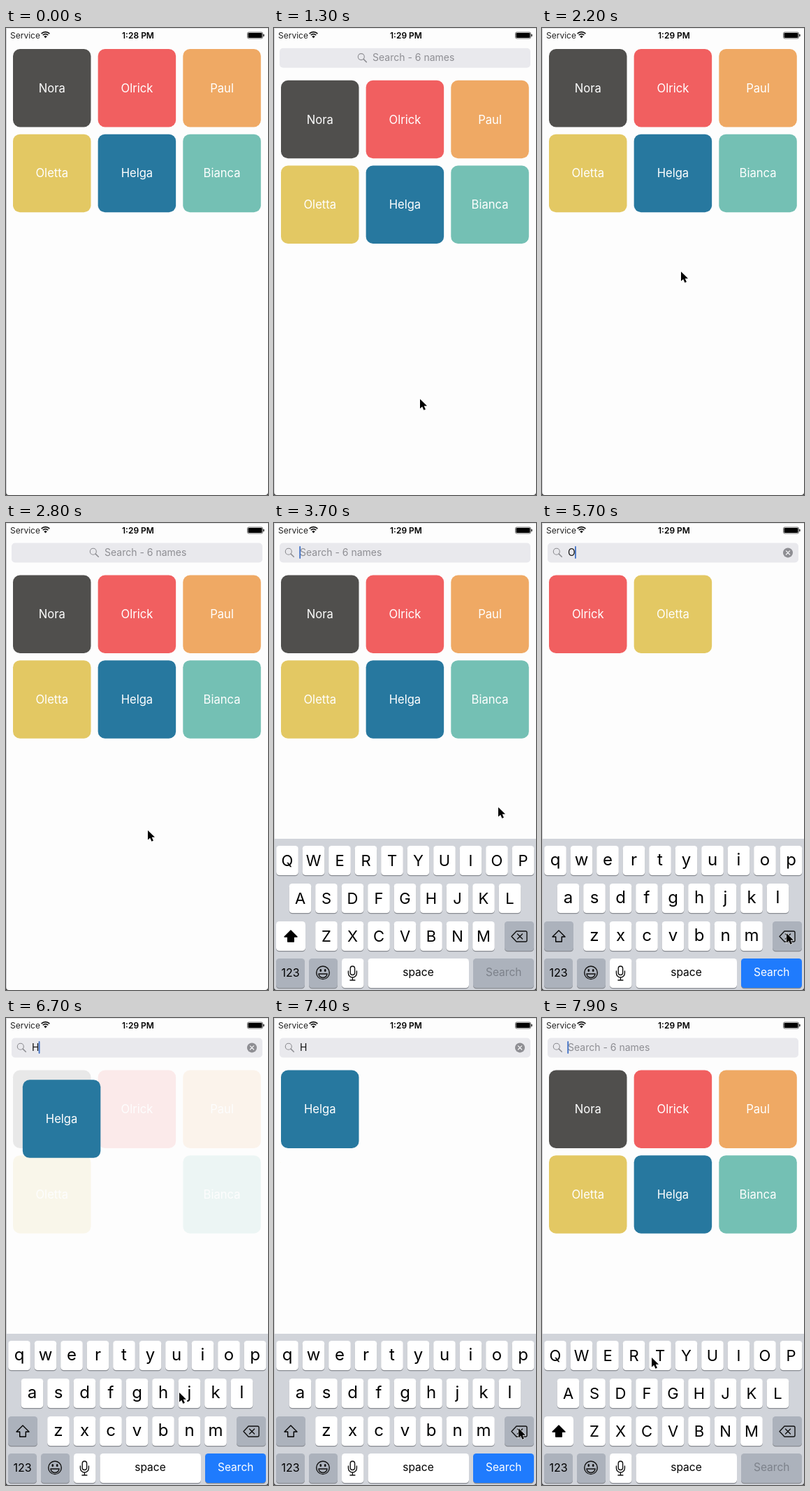
Write an HTML page that moves like this. It is 375x667 px and loops after 8000 ms.

```html
<!DOCTYPE html>
<html lang="en">
<head>
<meta charset="utf-8">
<title>Name search</title>
<style>
  html, body { margin: 0; width: 100%; height: 100%; overflow: hidden; background: #fdfdfd; }
  svg { display: block; width: 100vw; height: 100vh; }
  text { font-family: Inter, Roboto, "Liberation Sans", sans-serif; }
</style>
</head>
<body>
<svg id="stage" viewBox="0 0 375 667"></svg>
<script>
const LOOP = 8000, STEP = 100, BAR_SHIFT = 44.5;
const TILE = 111.5, PITCH = 121.65;
const PEOPLE = [
  ["Nora", "#504f4d"], ["Olrick", "#f15f60"], ["Paul", "#efa964"],
  ["Oletta", "#e3c863"], ["Helga", "#27789f"], ["Bianca", "#74c0b4"]
];

// Typed text over time
const QUERIES = [[0, ""], [4050, "O"], [4570, "Ol"], [5430, "O"], [5780, ""], [6463, "H"], [7450, ""]];
const FOCUS = 3220, FILTER_MS = 300;

// Key poses: time, then values
const SCROLL = [[0, 0], [300, 0], [800, 62], [900, 62], [1200, 44.8], [1450, 44.8],
  [1900, 0], [2380, 0], [2700, BAR_SHIFT]];
const POINTER = [[100, 206, 350], [300, 206, 350], [850, 209, 526], [1000, 209, 531],
  [1300, 209, 530], [1450, 209, 530], [2000, 199, 350], [2200, 199, 348], [2350, 199, 348],
  [2700, 203, 439], [2850, 203, 439], [3150, 195, 40], [3300, 195, 40], [3700, 321, 406],
  [4000, 322, 484], [4250, 322, 484], [4550, 342, 542], [5000, 342, 542], [5350, 350, 586],
  [5900, 350, 586], [6350, 228, 535], [6550, 230, 535], [6700, 248, 535], [7150, 350, 586],
  [7600, 350, 586], [7800, 257, 526], [7900, 157, 485]];

const clamp = v => Math.max(0, Math.min(1, v));
const ease = v => { v = clamp(v); return v * v * (3 - 2 * v); };
const mix = (a, b, k) => a + (b - a) * k;

function pose(keys, t) {
  let i = 0;
  while (i < keys.length - 1 && keys[i + 1][0] <= t) i++;
  const a = keys[i], b = keys[i + 1];
  if (!b || t < a[0]) return a.slice(1);
  const k = ease((t - a[0]) / (b[0] - a[0]));
  return a.slice(1).map((v, n) => mix(v, b[n + 1], k));
}

function el(parent, tag, attrs = {}, content) {
  const node = document.createElementNS("http://www.w3.org/2000/svg", tag);
  set(node, attrs);
  if (content !== undefined) node.textContent = content;
  parent.appendChild(node);
  return node;
}
function set(node, attrs) {
  for (const name in attrs) node.setAttribute(name, attrs[name]);
}
const show = (node, on) => set(node, { visibility: on ? "visible" : "hidden" });
const move = (node, x, y) => set(node, { transform: `translate(${x} ${y})` });
const label = (parent, x, y, size, content, attrs = {}) =>
  el(parent, "text", { x, y, "font-size": size, ...attrs }, content);
const box = (parent, x, y, width, height, rx, fill) =>
  el(parent, "rect", { x, y, width, height, rx, fill });
const line = (parent, d, stroke, width, attrs = {}) =>
  el(parent, "path", { d, stroke, "stroke-width": width, fill: "none", ...attrs });
const MID = { "text-anchor": "middle" };
const ROUND = { "stroke-linecap": "round", "stroke-linejoin": "round" };

const stage = document.getElementById("stage");
box(stage, 0, 0, 375, 667, 0, "#fdfdfd");

// Tiles
const tileLayer = el(stage, "g");
const tiles = PEOPLE.map(([name, fill]) => {
  const g = el(tileLayer, "g");
  box(g, 0, 0, TILE, TILE, 10, fill);
  label(g, TILE / 2, TILE / 2 + 6, 16.6, name, { fill: "#fff", ...MID });
  return g;
});

// Search bar
const bar = el(stage, "g");
box(bar, 8, 28.5, 359, 28, 5, "#e9e9ed");
const hint = el(bar, "g");
const glass = el(hint, "g", { fill: "none", stroke: "#8e8e93", "stroke-width": 1.1 });
el(glass, "circle", { cx: 20.8, cy: 40.8, r: 4.5 });
el(glass, "path", { d: "M24.1 44.1L28.3 48.3", "stroke-width": 1.5, "stroke-linecap": "round" });
const placeholder = label(hint, 37, 47, 14, "Search - 6 names", { fill: "#8e8e93" });
const typed = label(bar, 37, 47, 14, "", { fill: "#111" });
const caret = box(bar, 0, 33, 1.8, 18, 0.9, "#3e70c6");
const clear = el(bar, "g");
el(clear, "circle", { cx: 352, cy: 42.4, r: 7, fill: "#8e8e93" });
line(clear, "M349.4 39.8l5.2 5.2m0-5.2l-5.2 5.2", "#f4f4f6", 1.2, ROUND);

// Status bar
const status = el(stage, "g");
box(status, 0, 0, 375, 20, 0, "#fdfdfd");
label(status, 6, 15, 12, "Service", { fill: "#222" });
for (const r of [8.3, 5.3]) {
  const c = r * Math.SQRT1_2;
  line(status, `M${56.5 - c} ${14 - c}A${r} ${r} 0 0 1 ${56.5 + c} ${14 - c}`, "#111", 1.7);
}
el(status, "path", { d: "M56.5 14.6l-2.3-2.5a3.3 3.3 0 0 1 4.6 0z", fill: "#111" });
const clock = label(status, 189, 15, 12, "", { fill: "#000", "font-weight": 600, ...MID });
el(status, "rect", { x: 345.5, y: 6, width: 22, height: 9, rx: 2, fill: "none", stroke: "#333", "stroke-width": 0.7 });
box(status, 346.5, 7, 20, 7, 1.2, "#000");
box(status, 368.2, 8.7, 1.4, 3.6, 0.7, "#222");

// Keyboard
const keyboard = el(stage, "g");
box(keyboard, 0, 451, 375, 216, 0, "#d1d4da");
const GREY = "#acb2bc";
function key(x, y, width, fill) {
  box(keyboard, x, y + 1.2, width, 42, 4.5, "#898c92");
  return box(keyboard, x, y, width, 42, 4.5, fill);
}
const letters = [];
["QWERTYUIOP", "ASDFGHJKL", "ZXCVBNM"].forEach((row, r) => {
  const first = [19, 37.5, 75][r], y = 461 + 54 * r;
  [...row].forEach((char, i) => {
    const x = first + i * 37.5;
    key(x - 15.8, y, 31.6, "#fff");
    letters.push({ char, y, node: label(keyboard, x, y, 22, char, MID) });
  });
});
const shiftKey = key(3, 569, 42, "#fff");
const shiftIcon = line(keyboard, "M24 582l9 9h-4.7v7h-8.6v-7H15z", "#000", 1.4, { "stroke-linejoin": "round" });
key(330, 569, 42, GREY);
line(keyboard, "M347 583h13a2 2 0 0 1 2 2v11a2 2 0 0 1-2 2h-13l-7-7.5zM348.5 587l7 7m0-7l-7 7", "#111", 1.4, ROUND);
key(3, 622, 41, GREY);
label(keyboard, 23.5, 648, 16, "123", MID);
key(50, 622, 41, GREY);
const smile = el(keyboard, "g", { fill: "none", stroke: "#111", "stroke-width": 1.4 });
el(smile, "circle", { cx: 70, cy: 642.3, r: 9.3 });
el(smile, "path", { d: "M64 644h12a6 5.5 0 0 1-12 0z" });
for (const cx of [66.8, 73.2]) el(smile, "ellipse", { cx, cy: 639, rx: 0.7, ry: 1.2, fill: "#111" });
key(97, 622, 31.5, "#fff");
el(keyboard, "rect", { x: 109.2, y: 633, width: 6.4, height: 12.5, rx: 3.2, fill: "none", stroke: "#111", "stroke-width": 1.4 });
line(keyboard, "M106.4 640v3a6 6 0 0 0 12 0v-3M112.4 649v4m-3.5 0h7", "#111", 1.4, ROUND);
key(134.5, 622, 144.5, "#fff");
label(keyboard, 206.5, 647, 15.5, "space", MID);
const searchKey = key(285, 622, 87, GREY);
const searchText = label(keyboard, 328.7, 647, 15.5, "Search", MID);

// Device edge
box(stage, 0, 0, 0.8, 667, 0, "#c6c6c8");
box(stage, 0, 0, 375, 0.8, 0, "#dedee0");
el(stage, "path", { d: "M0 663a4 4 0 0 0 4 4H0zM375 663a4 4 0 0 1-4 4h4z", fill: "#333" });

const pointer = el(stage, "path", {
  d: "M0 0V13.6L3.2 10.7L5.4 15.8L7.9 14.7L5.7 9.8H10Z",
  fill: "#000", stroke: "#fff", "stroke-width": 1.1, "paint-order": "stroke"
});

const slots = query => {
  let n = 0;
  return PEOPLE.map(([name]) => name.startsWith(query) ? n++ : -1);
};
const slotX = n => 10 + (n % 3) * PITCH;
const slotY = n => 30 + Math.floor(n / 3) * PITCH;

function drawTiles(from, to, k, scroll) {
  const before = slots(from), after = slots(to);
  tiles.forEach((tile, i) => {
    const a = before[i] < 0 ? i : before[i], b = after[i] < 0 ? a : after[i];
    const start = before[i] < 0 ? b : a;
    move(tile, mix(slotX(start), slotX(b), k), mix(slotY(start), slotY(b), k) + scroll);
    set(tile, { opacity: mix(+(before[i] >= 0), +(after[i] >= 0), k) });
  });
  // Matching tiles stay above fading ones
  const query = to || from;
  tiles.forEach((tile, i) => { if (PEOPLE[i][0].startsWith(query)) tileLayer.appendChild(tile); });
}

function drawKeys(typing) {
  for (const { char, y, node } of letters) {
    node.textContent = typing ? char.toLowerCase() : char;
    set(node, { y: y + (typing ? 28 : 29), "font-size": typing ? 24 : 22 });
  }
  set(shiftKey, { fill: typing ? GREY : "#fff" });
  set(shiftIcon, { fill: typing ? "none" : "#000" });
  set(searchKey, { fill: typing ? "#1f7bfd" : GREY });
  set(searchText, { fill: typing ? "#fff" : "#7c818a" });
}

function draw(t) {
  let q = 0;
  while (q < QUERIES.length - 1 && QUERIES[q + 1][0] <= t) q++;
  const [since, query] = QUERIES[q];
  const [scroll] = pose(SCROLL, t);
  drawTiles(q ? QUERIES[q - 1][1] : "", query, q ? ease((t - since) / FILTER_MS) : 1, scroll);

  move(bar, 0, scroll - BAR_SHIFT);
  move(hint, 104 * (1 - ease((t - FOCUS) / 300)), 0);
  typed.textContent = query;
  show(placeholder, !query);
  show(clear, query);
  const lastInput = Math.max(since, FOCUS);
  show(caret, t >= FOCUS + 200 && (t - lastInput) % 1000 < 620);
  set(caret, { x: 36.3 + (query ? typed.getComputedTextLength() : 0) });

  const rise = 1 - Math.pow(1 - clamp((t - FOCUS) / 380), 3);
  move(keyboard, 0, 216 * (1 - rise));
  drawKeys(query !== "");

  clock.textContent = t < 100 ? "1:28 PM" : "1:29 PM";
  show(pointer, t >= 100);
  move(pointer, ...pose(POINTER, t));
}

function tick() {
  const t = performance.now() % LOOP;
  draw(Math.floor(t / STEP) * STEP);
  requestAnimationFrame(tick);
}
tick();
</script>
</body>
</html>
```
